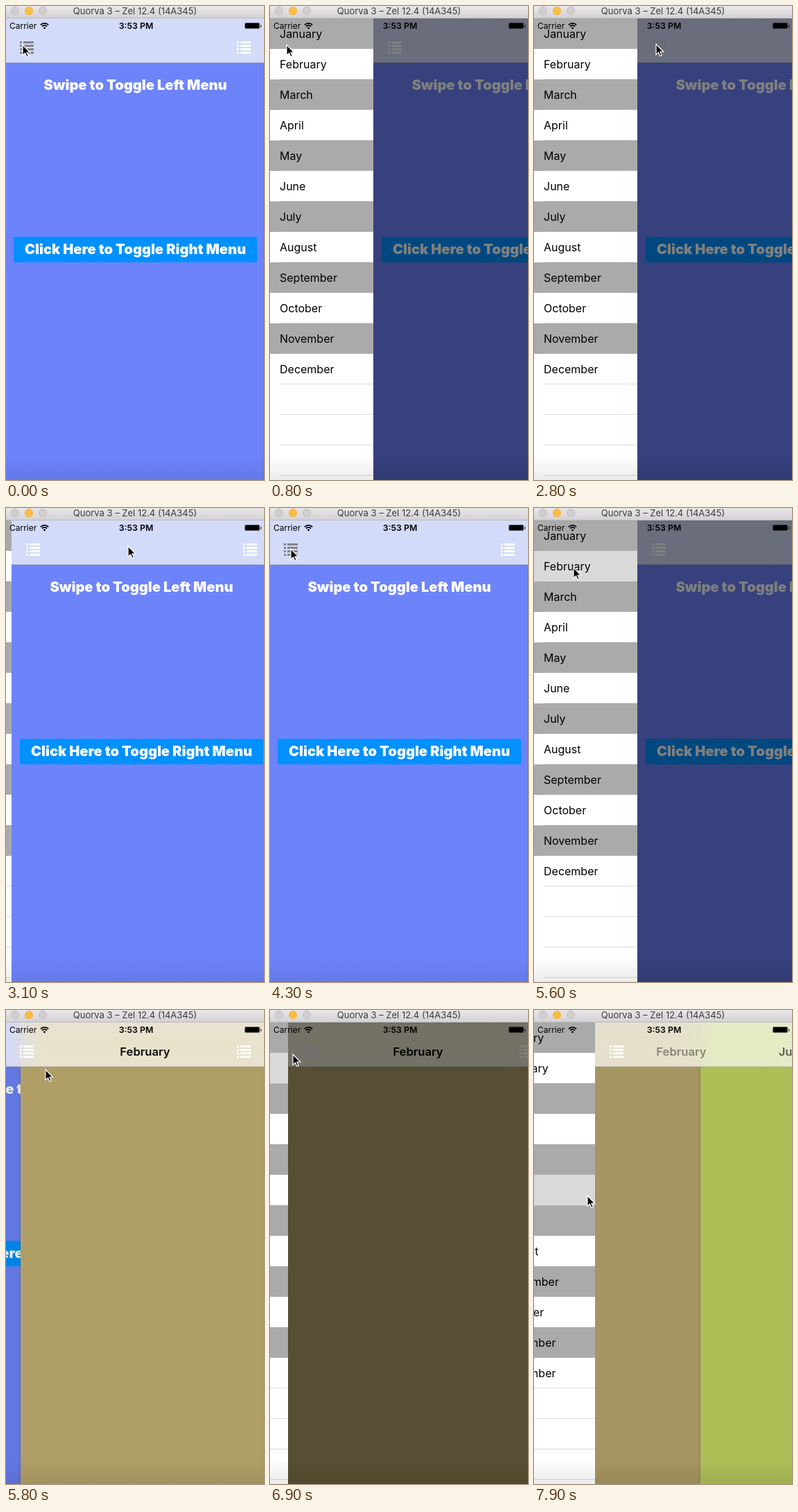
An HTML page for the animation above (8 s loop, 372 px wide and 684 px high).

```html
<!DOCTYPE html>
<html lang="en">
<head>
<meta charset="utf-8">
<title>Side menu demo</title>
<style>
  html, body { margin: 0; width: 100%; height: 100%; overflow: hidden; }
  body { position: relative; background: #fff; color: #000; font-family: Inter, Roboto, sans-serif; }
  div, svg { position: absolute; }
  #stage { left: 0; top: 0; width: 372px; height: 684px; overflow: hidden; }

  #titlebar { left: 0; top: 0; width: 372px; height: 17px; background: linear-gradient(#e9e7e9, #d3d1d3); border-bottom: 1px solid #bcbabc; }
  #titlebar b { position: absolute; top: 1px; width: 10px; height: 10px; border: 1px solid #bebcbe; border-radius: 50%; background: #d0ced0; }
  #titlebar b.on { background: #fdbc40; border-color: #f0b03a; }
  #caption { left: 0; width: 372px; top: 0; line-height: 15px; font-size: 13px; text-align: center; color: #3c3c3c; }

  #screen { left: 0; top: 18px; width: 372px; height: 666px; overflow: hidden; }
  #menu { left: 0; top: 0; width: 150px; height: 666px; background: #fff; overflow: hidden; }
  .row { left: 0; width: 150px; height: 44px; line-height: 44px; padding-left: 14px; font-size: 16px; box-sizing: border-box; }
  .row::after { content: ""; position: absolute; left: 14px; right: 0; bottom: 0; height: 1px; background: #dcdbdf; }
  .row.odd { background: #aaa; }
  .row.odd::after { background: #b4b4b6; }
  .row.picked { background: #d9d9d9; }

  #app { left: -1px; top: 0; width: 375px; height: 666px; overflow: hidden; }
  .page { left: 0; top: 0; width: 375px; height: 666px; box-shadow: 0 0 4px rgba(0, 0, 0, .2); }
  .page div { color: #fff; font-weight: 900; font-size: 20.1px; text-align: center; white-space: nowrap; }
  #home { background: #6d83fa; }
  #feb { background: #af9e66; }
  #june { background: #adbe57; }
  #hint { left: 0; width: 375px; top: 84px; line-height: 24px; }
  #button { left: 12px; width: 351px; top: 315px; height: 37px; line-height: 36px; border-radius: 2px; background: #0091ff; }
  #nav { left: 0; top: 0; width: 375px; height: 64px; box-sizing: border-box; background: rgba(248, 248, 248, .76); border-bottom: 1px solid rgba(0, 0, 0, .15); backdrop-filter: blur(16px) saturate(1.7); }
  .title { left: 0; top: 31px; width: 375px; line-height: 22px; text-align: center; font-size: 16.6px; font-weight: 600; }
  .list { top: 33px; width: 20px; height: 18px; fill: currentColor; color: #fff; }
  #dim { left: 0; top: 0; width: 375px; height: 666px; background: rgba(0, 0, 0, .5); }

  .status { top: 20px; line-height: 17px; font-size: 12px; white-space: nowrap; }
  #clock { left: 137px; width: 101px; text-align: center; font-weight: 600; font-size: 12.3px; }
  #battery { left: 344px; top: 24px; width: 20px; height: 7px; border: 1px solid rgba(0, 0, 0, .55); border-radius: 2px; background: #000; background-clip: padding-box; }
  #battery::after { content: ""; position: absolute; left: 21.5px; top: 1.5px; width: 1.5px; height: 4px; border-radius: 0 1px 1px 0; background: #000; }
  #shade { left: 0; bottom: 0; width: 372px; height: 36px; background: linear-gradient(transparent, rgba(0, 0, 0, .08)); }
</style>
</head>
<body>
<div id="stage">
  <div id="screen">
    <div id="menu"></div>
    <div id="app">
      <div class="page" id="home">
        <div id="hint">Swipe to Toggle Left Menu</div>
        <div id="button">Click Here to Toggle Right Menu</div>
      </div>
      <div class="page" id="feb"></div>
      <div class="page" id="june"></div>
      <div id="nav"></div>
      <div class="title" id="febTitle">February</div>
      <div class="title" id="juneTitle">June</div>
      <svg class="list" id="leftIcon" style="left:21px"><path id="bars" d="M0 0h3v3h-3zM5 0h15v3h-15zM0 5h3v3h-3zM5 5h15v3h-15zM0 10h3v3h-3zM5 10h15v3h-15zM0 15h3v3h-3zM5 15h15v3h-15z"/></svg>
      <svg class="list" style="left:334px"><use href="#bars"/></svg>
      <div id="dim"></div>
    </div>
  </div>
  <div class="status" style="left:5px">Carrier</div>
  <svg style="left:49px;top:23px" width="13" height="11" fill="none" stroke="#000" stroke-width="1.9">
    <path d="M.9 4.2a8 8 0 0 1 11.2 0M3 6.5a5 5 0 0 1 7 0"/>
    <path d="M6.5 10.4L4.6 8.4a2.8 2.8 0 0 1 3.8 0z" fill="#000" stroke="none"/>
  </svg>
  <div class="status" id="clock">3:53 PM</div>
  <div id="battery"></div>
  <div id="shade"></div>
  <div id="titlebar">
    <b style="left:7px"></b><b class="on" style="left:27px"></b><b style="left:47px"></b>
    <div id="caption">Quorva 3 – Zel 12.4 (14A345)</div>
  </div>
  <svg id="pointer" style="left:0;top:0" width="16" height="22">
    <path d="M1 1v15.2l3.5-3.3 2.3 5.3 2.4-1-2.3-5.2h4.8z" stroke="#fff" stroke-width="1.2"/>
  </svg>
</div>
<script>
const LOOP = 8000, STEP = 100, MENU = 150, WIDTH = 375;
const $ = id => document.getElementById(id);
const clamp = x => Math.min(1, Math.max(0, x));
const smooth = x => { x = clamp(x); return x * x * (3 - 2 * x); };
const slide = (el, x, y = 0) => { el.style.transform = `translate(${Math.round(x)}px, ${Math.round(y)}px)`; };

const months = ["January", "February", "March", "April", "May", "June", "July",
  "August", "September", "October", "November", "December", "", "", ""];
const rows = months.map((name, i) => {
  const row = document.createElement("div");
  row.className = "row" + (name && i % 2 === 0 ? " odd" : "");
  row.style.top = i * 44 + "px";
  row.textContent = name;
  $("menu").append(row);
  return row;
});

// Each session: menu opens, then closes; a pick also pushes a page.
const sessions = [
  { open: 0, close: 2800 },
  { open: 4300, close: 5600, pick: true },
  { open: 6800, close: 7800, pick: true }
];
const presses = [0, 2800, 4300, 6850];
const pointerPath = [
  [0, 23, 55], [900, 23, 55], [1700, 178, 60], [1900, 178, 60], [2000, 175, 54],
  [3100, 175, 54], [4000, 29, 58], [4400, 29, 58], [4600, 92, 74], [5100, 88, 118],
  [5300, 56, 85], [6400, 56, 85], [6700, 32, 63], [7000, 32, 63], [7600, 76, 267], [LOOP, 76, 267]
];

const toggled = ms => smooth((ms - 7) / 345);
const dismissed = ms => clamp(ms / 200) ** 1.3;
const pushed = ms => ms <= 0 ? 0 : ms > 500 ? 1 : 1 - Math.exp(-.905 * (ms / 100) ** 1.65);

function menuOffset(t) {
  return MENU * sessions.reduce((sum, s) =>
    sum + toggled(t - s.open) - (s.pick ? dismissed : toggled)(t - s.close), 0);
}

function pointerAt(t) {
  const i = pointerPath.findIndex(p => p[0] > t);
  const [t0, x0, y0] = pointerPath[i - 1], [t1, x1, y1] = pointerPath[i];
  const k = smooth((t - t0) / (t1 - t0));
  return [x0 + (x1 - x0) * k, y0 + (y1 - y0) * k];
}

function pose(page, enter, leave) {
  slide(page, WIDTH * (1 - enter) - 112 * leave);
  page.style.filter = leave ? `brightness(${1 - .1 * leave})` : "none";
}

function poseTitle(title, enter, leave) {
  slide(title, 240 * (1 - enter) - 105 * leave);
  title.style.opacity = enter * (1 - leave);
}

function render(t) {
  const offset = Math.round(menuOffset(t));
  slide($("menu"), offset - MENU);
  slide($("app"), offset);
  const dimmed = sessions.some(s => t > s.open && t <= s.close);
  $("dim").hidden = !dimmed;

  const feb = pushed(t - sessions[1].close), june = pushed(t - sessions[2].close);
  pose($("home"), 1, feb);
  pose($("feb"), feb, june);
  pose($("june"), june, 0);
  poseTitle($("febTitle"), feb, june);
  poseTitle($("juneTitle"), june, 0);

  rows[1].classList.toggle("picked", t >= 5600 && t < 7300);
  rows[5].classList.toggle("picked", t >= 7800);

  // The pressed tint is weaker while the page is dimmed.
  const press = Math.max(...presses.map(p => t < p ? 0 : clamp(1 - (t - p) / 220)));
  const glow = press * (dimmed ? .3 : 1);
  const shade = 255 - 122 * glow;
  $("leftIcon").style.color = `rgb(${shade}, ${shade}, ${shade + 8 * glow})`;
  slide($("pointer"), ...pointerAt(t));
}

const start = performance.now();
function tick() {
  const t = (performance.now() - start) % LOOP;
  render(Math.floor(t / STEP) * STEP);
  requestAnimationFrame(tick);
}
tick();
</script>
</body>
</html>
```
